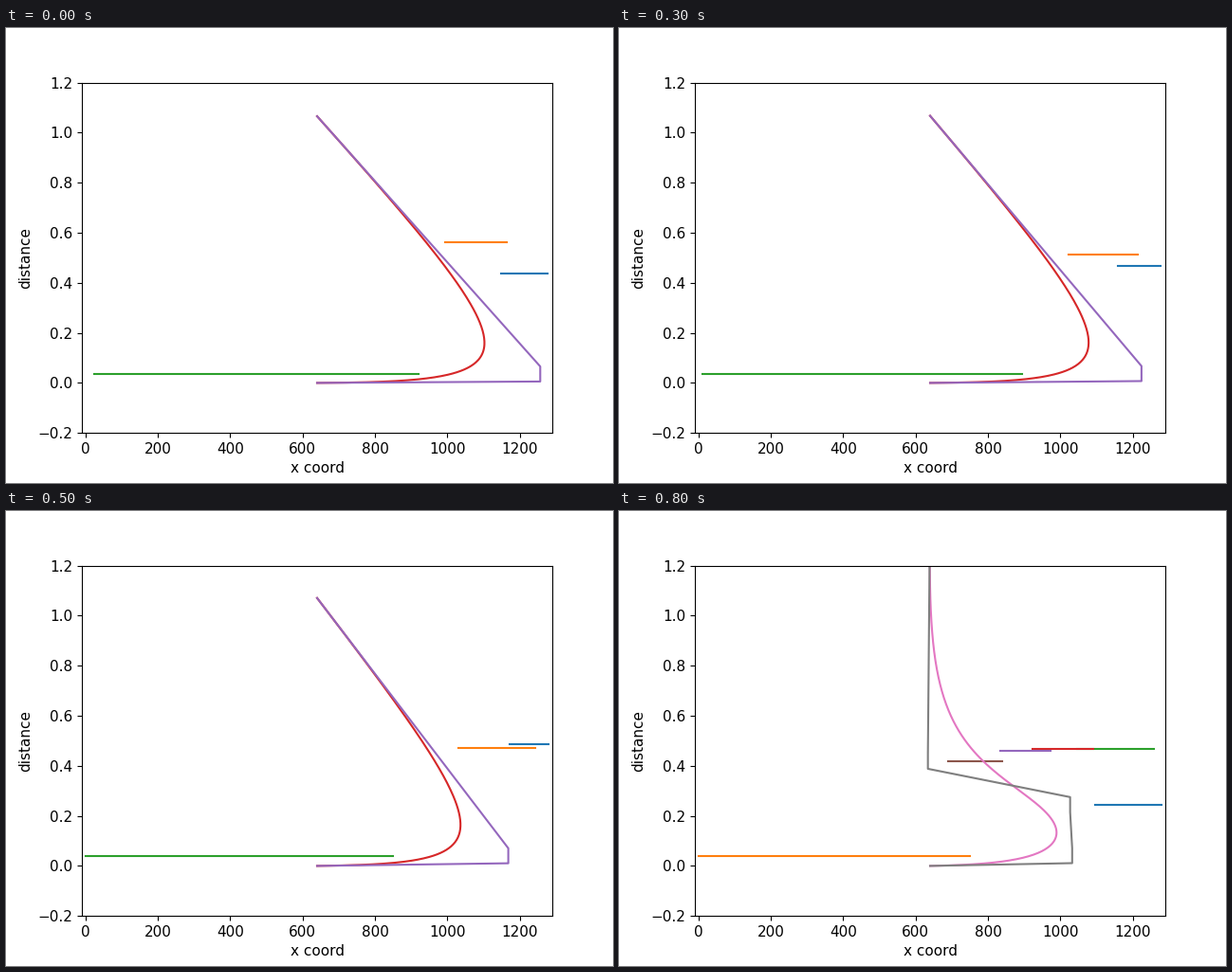
These frames come from a looping animation (640x480 px, 0.9 s). A matplotlib script:

```python
from math import comb

import matplotlib.pyplot as plt
import numpy as np
from matplotlib.animation import FuncAnimation

FRAMES, INTERVAL = 9, 100
START_X = 640
SIDE, GAP = 0.375, 0.03  # clearance beside a bar (share of its width) and above/below it

plt.rcParams.update({"font.family": "DejaVu Sans", "font.size": 11})

# Each scene: bars as (x0, x1, distance) in colour order,
# and the bars the route avoids, each with the end it passes (0 left, 1 right).
SCENES = {
    0: ({"far": (1148.5, 1277, 0.437), "mid": (994, 1164, 0.562),
         "near": (24, 920.5, 0.0356)}, [("near", 1)]),
    2: ({"far": (1143, 1274.5, 0.430), "mid": (994, 1161.5, 0.562),
         "near": (21.5, 918.5, 0.0356)}, [("near", 1), ("far", 0)]),
    4: ({"far": (1177, 1280, 0.502), "mid": (1049, 1269, 0.464),
         "near": (0, 868, 0.039)}, [("near", 1)]),
    6: ({"far": (1169, 1280, 0.472), "near": (0, 831.5, 0.042),
         "mid": (1009.5, 1219, 0.479), "left": (881, 1057, 0.449)},
        [("near", 1)]),
    7: ({"far": (1143.5, 1280, 0.297), "near": (0, 788, 0.040),
         "mid": (1025, 1230, 0.472), "left": (931, 1091, 0.483),
         "left2": (800, 949.5, 0.437)}, [("near", 1), ("far", 0)]),
    8: ({"far": (1096, 1280, 0.245), "near": (0, 751, 0.041),
         "mid": (1045, 1259, 0.468), "left": (923, 1091, 0.468),
         "left2": (834, 973, 0.460), "left3": (690, 839.5, 0.418)},
        [("near", 1), ("far", 0), ("left3", 0)]),
}


def blend(base, other):
    """Halfway bars, keeping the order and route of the base scene."""
    bars, route = base
    mixed = {k: tuple(np.mean([v, other[0][k]], axis=0)) for k, v in bars.items()}
    return mixed, route


SCENES[1] = blend(SCENES[0], SCENES[2])
SCENES[3] = blend(SCENES[4], SCENES[2])
SCENES[5] = blend(SCENES[4], SCENES[6])


def waypoints(bars, route):
    pts = [(START_X, 0)]
    for name, end in route:
        x0, x1, y = bars[name]
        pad = SIDE * (x1 - x0)
        x = x1 + pad if end else x0 - pad
        pts += [(x, y - GAP), (x, y + GAP)]
    last = route[-1][0] if len(route) > 2 else route[0][0]
    pts.append((START_X, 1 + bars[last][2] + GAP))
    return np.array(pts)


def bezier(pts, samples=200):
    t = np.linspace(0, 1, samples)
    n = len(pts) - 1
    basis = [comb(n, k) * t**k * (1 - t)**(n - k) for k in range(n + 1)]
    return np.transpose(basis) @ pts


fig, ax = plt.subplots(figsize=(6.4, 4.8), dpi=100)
ax.set(xlim=(-10, 1290), ylim=(-0.2, 1.2), xlabel="x coord", ylabel="distance")
lines = [ax.plot([], [], color=f"C{i}")[0] for i in range(8)]


def draw(frame):
    bars, route = SCENES[frame]
    pts = waypoints(bars, route)
    shapes = [([x0, x1], [y, y]) for x0, x1, y in bars.values()]
    shapes += [bezier(pts).T, pts.T]
    shapes += [([], [])] * (len(lines) - len(shapes))
    for line, (x, y) in zip(lines, shapes):
        line.set_data(x, y)
    return lines


anim = FuncAnimation(fig, draw, frames=FRAMES, interval=INTERVAL,
                     repeat=True, repeat_delay=0, init_func=lambda: draw(0))
plt.show()
```
